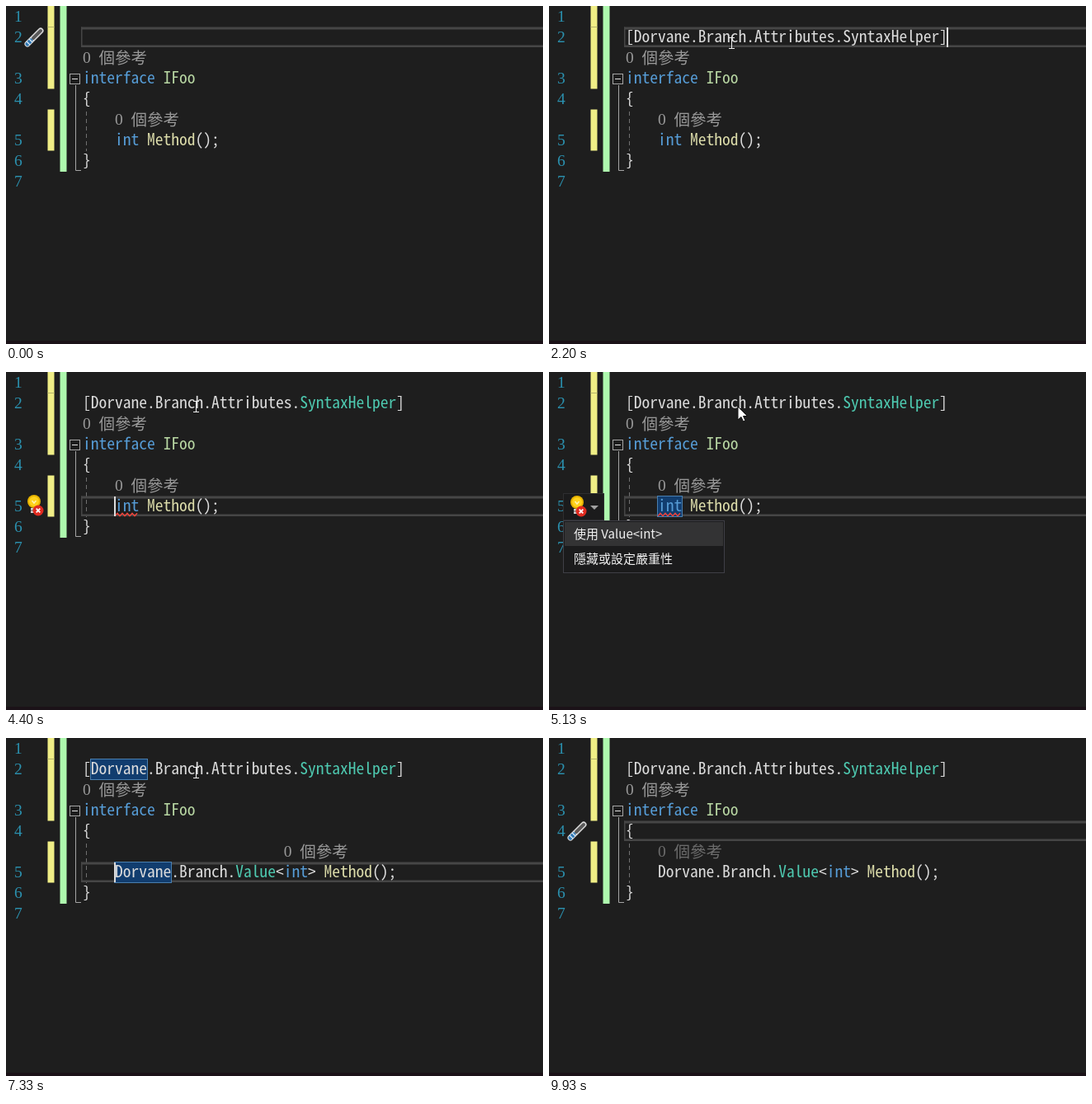
Write an HTML page with a canvas that moves like this. It is 651 px wide and 410 px high and loops after 9.99 s.

```html
<!DOCTYPE html>
<html lang="zh-Hant">
<head>
<meta charset="utf-8">
<title>Code editor</title>
<style>
  html, body { margin: 0; width: 100%; height: 100%; overflow: hidden; background: #1e1e1e; }
  canvas { display: block; }
</style>
</head>
<body>
<canvas id="stage" width="651" height="410"></canvas>
<script>
const ctx = document.getElementById('stage').getContext('2d');
const LOOP = 9990;
const CELL = 9.75;
const LEFT = 93;
const MONO = '"Noto Sans Mono CJK TC", "Noto Sans Mono CJK JP", "Liberation Mono", monospace';
const CJK = '"Noto Sans CJK TC", "Noto Sans CJK JP", "Noto Sans CJK", sans-serif';
const DIGITS = '19.5px "Liberation Serif", serif';
const C = {
  bg: '#1e1e1e', number: '#2b91af', plain: '#dcdcdc', keyword: '#569cd6',
  iface: '#b8d7a3', method: '#dcdcaa', type: '#4ec9b0', lens: '#999999',
  mark: '#113d6f', markEdge: '#4a7fae', line: '#464646'
};
// Vertical centre of each numbered line; lenses sit between some of them.
const ROW = { 1: 13, 2: 38, 3: 88, 4: 113, 5: 163, 6: 188, 7: 213 };

// [from, to, line, column]
const CARETS = [
  [1930, 2200, 2, 0], [2200, 2730, 2, 40], [3000, 3200, 3, 14],
  [3200, 3330, 4, 1], [3330, 3870, 5, 17], [3930, 4470, 5, 4],
  [6330, 7600, 5, 4], [8130, 8270, 5, 4], [8270, 8800, 4, 1], [9330, 9860, 4, 1]
];
// [time, x, y]
const POINTER = [
  [600, 443, 144], [800, 376, 104], [1000, 300, 62], [1200, 246, 36],
  [1330, 226, 38], [1470, 221, 45], [2200, 221, 45], [2470, 230, 42]
];

ctx.font = '100px ' + MONO;
const codeFont = (100 * CELL / ctx.measureText('0').width) + 'px ' + MONO;

const within = (t, a, b) => t >= a && t < b;
const colX = col => LEFT + col * CELL;

function box(x, y, w, h, fill, edge) {
  ctx.fillStyle = fill;
  ctx.fillRect(x, y, w, h);
  if (edge) {
    ctx.strokeStyle = edge;
    ctx.lineWidth = 1;
    ctx.strokeRect(x + .5, y + .5, w - 1, h - 1);
  }
}

function path(points, color, width = 1) {
  ctx.strokeStyle = color;
  ctx.lineWidth = width;
  ctx.beginPath();
  points.forEach(([x, y]) => ctx.lineTo(x, y));
  ctx.stroke();
}

function disc(x, y, r, color) {
  ctx.fillStyle = color;
  ctx.beginPath();
  ctx.arc(x, y, r, 0, 7);
  ctx.fill();
}

function label(text, x, y, color, font) {
  ctx.font = font;
  ctx.fillStyle = color;
  ctx.fillText(text, x, y);
}

function code(runs, x, y) {
  for (const [text, color] of runs) {
    label(text, x, y + 6, color, codeFont);
    x += text.length * CELL;
  }
}

function lens(x, y, alpha = 1) {
  ctx.globalAlpha = alpha;
  label('0', x, y + 6, C.lens, DIGITS);
  label('個參考', x + 2 * CELL, y + 7, C.lens, '300 19.5px ' + CJK);
  ctx.globalAlpha = 1;
}

function currentLine(t) {
  if (t < 3000) return 2;
  if (t < 3200) return 3;
  if (t < 3330 || t >= 8270) return 4;
  return 5;
}

function highlightLine(line) {
  const y = ROW[line];
  ctx.fillStyle = C.line;
  ctx.fillRect(91, y - 12.5, 560, 3);
  ctx.fillRect(91, y + 9.5, 560, 2.5);
  ctx.fillRect(91, y - 12.5, 1.5, 24.5);
}

function markWord(line, col, length) {
  box(Math.round(colX(col)) - 1, ROW[line] - 13, Math.ceil(length * CELL) + 1, 26, C.mark, C.markEdge);
}

function squiggle(x, y, width) {
  const points = [];
  for (let i = 0; i <= width; i += 3) points.push([x + i, y + (i % 2 ? -1.7 : 1.7)]);
  path(points, '#f0453c', 1.4);
}

function margins() {
  ctx.fillStyle = '#f0ee86';
  ctx.fillRect(50.5, 0, 8, 100.5);
  ctx.fillRect(50.5, 125.5, 8, 50);
  path([[50.5, 25.5], [58.5, 25.5]], '#b5b36a');
  ctx.fillStyle = '#aef8ae';
  ctx.fillRect(65.5, 0, 8, 201);
  box(77, 82, 13, 13, C.bg, '#a5a5a5');
  path([[80, 88.5], [87, 88.5]], '#e0e0e0');
  path([[84.5, 96], [84.5, 199.5], [91, 199.5]], '#a5a5a5');
  ctx.setLineDash([5, 4]);
  path([[97.5, 128], [97.5, 176]], '#707070');
  ctx.setLineDash([]);
}

function screwdriver(y) {
  ctx.lineCap = 'round';
  path([[26, y + 8], [32, y + 2], [42, y - 8]], '#dcdcdc', 7);
  path([[33, y + 1], [42, y - 8]], '#5a5a5a', 4);
  path([[26, y + 8], [30, y + 4]], '#2f78b4', 5);
  ctx.lineCap = 'butt';
  for (let i = 0; i < 2; i++) {
    path([[25 + i * 3, y + 5 - i * 3], [29 + i * 3, y + 9 - i * 3]], '#dbe9f4', 1.2);
  }
}

function bulb(x, y) {
  disc(x, y - 2, 8, '#e8b400');
  disc(x, y - 2, 6, '#ffd21c');
  path([[x - 2.5, y - 3], [x, y], [x + 2.5, y - 3]], '#fff3b0', 1.5);
  box(x - 4, y + 6, 7, 6, '#d0d0d0');
  path([[x - 4, y + 9], [x + 3, y + 9]], '#555555');
  disc(x + 5, y + 9, 6.5, '#e02b20');
  path([[x + 2.7, y + 6.7], [x + 7.3, y + 11.3]], '#ffffff', 1.7);
  path([[x + 7.3, y + 6.7], [x + 2.7, y + 11.3]], '#ffffff', 1.7);
}

function bulbMenu() {
  box(17, 147, 50, 33, '#1b1b1c', '#2e2e30');
  bulb(34, 160);
  ctx.fillStyle = '#a0a0a0';
  ctx.beginPath();
  [[50, 162], [60, 162], [55, 167]].forEach(p => ctx.lineTo(...p));
  ctx.fill();
}

const valueRuns = colored => [
  ['Dorvane.Branch.', C.plain], ['Value', colored ? C.type : C.plain],
  ['<', C.plain], ['int', C.keyword], ['> ', C.plain], ['Method', C.method], ['();', C.plain]
];
const intRuns = [['int', C.keyword], [' ', C.plain], ['Method', C.method], ['();', C.plain]];

function fixList() {
  const font = '15px ' + CJK;
  box(17, 180, 196, 64, '#1b1b1c', '#3f3f46');
  box(19, 182, 192, 29, '#333334');
  label('使用 Value<int>', 30, 202, '#f1f1f1', font);
  label('隱藏或設定嚴重性', 30, 232, '#f1f1f1', font);
}

function fixPreview() {
  box(212, 180, 439, 183, '#252526', '#3f3f46');
  box(222, 222, 429, 25, '#4b1818');
  box(222, 247, 429, 25, '#24391f');
  code([['{', C.plain]], 230, 210);
  code(intRuns, 269, 235);
  code(valueRuns(true), 269, 260);
  code([['}', C.plain]], 230, 285);
  path([[213, 326.5], [651, 326.5]], '#3f3f46');
  label('預覽變更', 228, 350, '#3794ff', '15px ' + CJK);
}

function pointerAt(t) {
  for (let i = 1; i < POINTER.length; i++) {
    const [t0, x0, y0] = POINTER[i - 1], [t1, x1, y1] = POINTER[i];
    if (t < t1) {
      const k = (t - t0) / (t1 - t0);
      return [x0 + (x1 - x0) * k, y0 + (y1 - y0) * k];
    }
  }
  return POINTER[POINTER.length - 1].slice(1);
}

function iBeam(x, y) {
  x = Math.round(x) + .5;
  y = Math.round(y);
  path([[x, y - 6], [x, y + 6]], '#f0f0f0');
  for (const end of [-6.5, 6.5]) path([[x - 3.5, y + end], [x + 3.5, y + end]], '#f0f0f0');
}

function arrow(x, y) {
  ctx.beginPath();
  [[0, 0], [0, 16], [4, 12.5], [6.5, 18], [9, 17], [6.5, 11.5], [11.5, 11.5]]
    .forEach(([dx, dy]) => ctx.lineTo(x + dx, y + dy));
  ctx.closePath();
  ctx.fillStyle = '#ffffff';
  ctx.fill();
  ctx.strokeStyle = '#111111';
  ctx.lineWidth = 1;
  ctx.stroke();
}

function methodLens(t) {
  if (t < 7000) lens(colX(4), 138);
  else if (t < 9000) lens(colX(25), 138, Math.min(1, (9000 - t) / 400));
  else if (t >= 9270) lens(colX(4), 138, (t - 9270) / 1050);
}

function draw(t) {
  box(0, 0, 651, 410, C.bg);
  box(0, 406, 651, 4, '#1b1218');
  margins();
  highlightLine(currentLine(t));

  if (within(t, 2470, 3530)) {
    for (const col of [0, 39]) box(Math.round(colX(col)), 26, 10, 24, C.mark);
  }
  if (within(t, 4470, 6800)) markWord(5, 4, 3);
  if (within(t, 7330, 8270)) {
    markWord(2, 1, 7);
    markWord(5, 4, 7);
  }

  for (const line in ROW) label(line, 10, ROW[line] + 6, C.number, DIGITS);
  if (t >= 2200) {
    code([
      ['[Dorvane.Branch.Attributes.', C.plain],
      ['SyntaxHelper', t < 2400 ? C.plain : C.type], [']', C.plain]
    ], LEFT, ROW[2]);
  }
  lens(LEFT, 63);
  code([['interface ', C.keyword], ['IFoo', C.iface]], LEFT, ROW[3]);
  code([['{', C.plain]], LEFT, ROW[4]);
  methodLens(t);
  code(t < 6800 ? intRuns : valueRuns(t >= 7000), colX(4), ROW[5]);
  code([['}', C.plain]], LEFT, ROW[6]);
  if (within(t, 4000, 6800)) squiggle(132, 173, 28);

  for (const [from, to, line, col] of CARETS) {
    if (within(t, from, to)) box(Math.round(colX(col)) - 1, ROW[line] - 12, 2, 24, C.plain);
  }

  if (t < 2200) screwdriver(38);
  if (within(t, 7670, 8270)) screwdriver(163);
  if (t >= 8800) screwdriver(113);
  if (within(t, 3930, 4930) || within(t, 6330, 6800)) bulb(34, 159);
  if (within(t, 4930, 6330)) bulbMenu();
  if (within(t, 5000, 6130)) fixList();
  if (within(t, 5200, 6130)) fixPreview();

  if (within(t, 4930, 6330)) arrow(229, 42);
  else if (within(t, 600, 8670)) iBeam(...pointerAt(t));
}

const start = performance.now();
function tick() {
  draw((performance.now() - start) % LOOP);
  requestAnimationFrame(tick);
}
tick();
</script>
</body>
</html>
```
